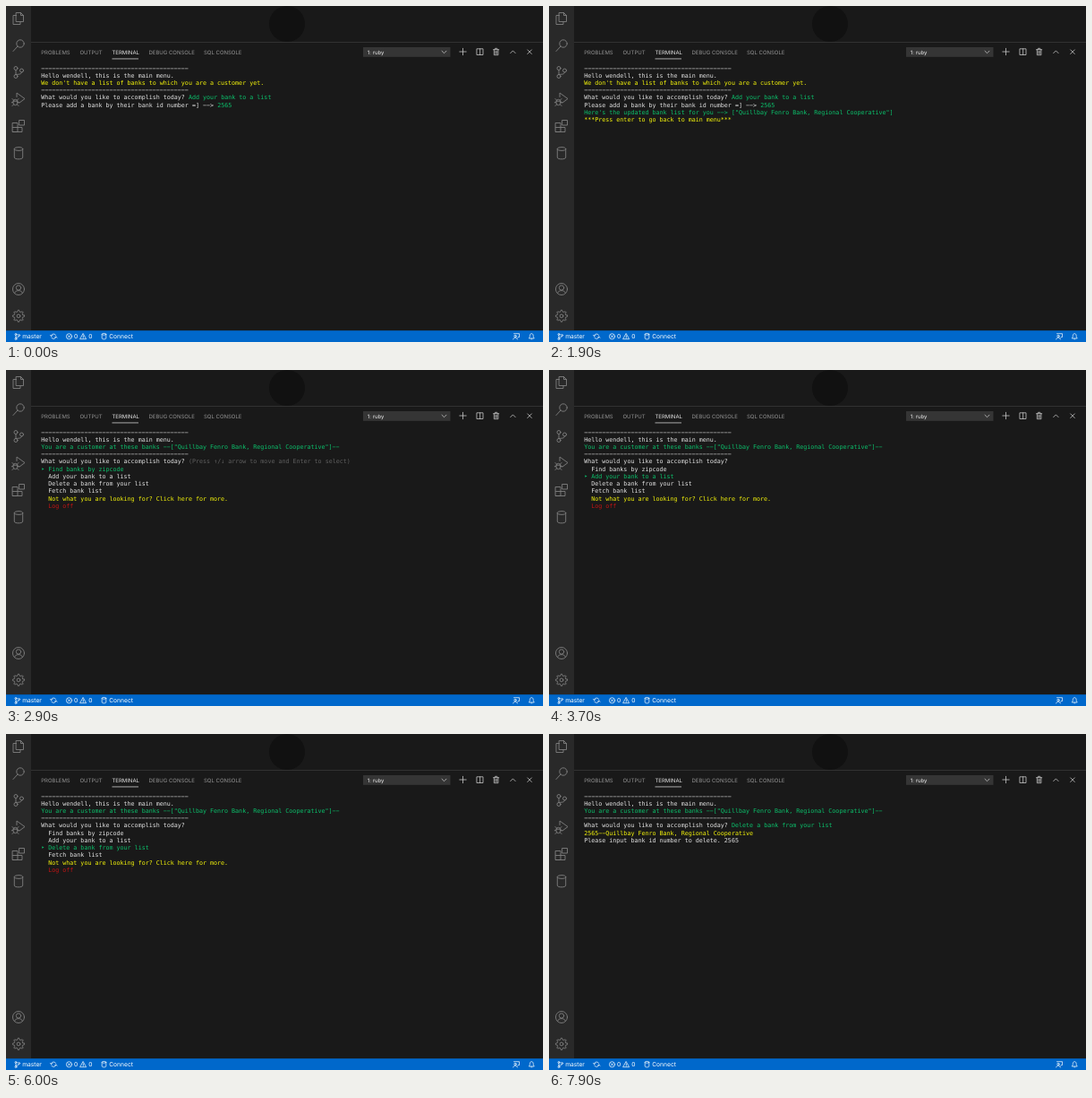
Animation, 600 px wide and 375 px high, one loop 8 s. Source, as an HTML page:

```html
<!DOCTYPE html>
<html lang="en">
<head>
<meta charset="utf-8">
<title>Terminal session</title>
<style>
  html, body { margin: 0; width: 100%; height: 100%; overflow: hidden; background: #191919; }
  svg { display: block; width: 100vw; height: 100vh; }
  text { white-space: pre; text-rendering: geometricPrecision; }
  #term { font: 6.68px "DejaVu Sans Mono", monospace; }
  .tabs { font: 6px Inter, sans-serif; fill: #939393; }
  .status text { font: 6.7px Inter, sans-serif; fill: #fff; }
  .line { fill: none; stroke-linecap: round; stroke-linejoin: round; }
  .side { stroke: #7f7f7f; stroke-width: .9; }
  .tool { stroke: #c5c5c5; stroke-width: .8; }
  .bar { stroke: #fff; stroke-width: .7; }
</style>
</head>
<body>
<svg viewBox="0 0 600 375" preserveAspectRatio="none">
  <rect width="600" height="375" fill="#191919"/>
  <circle cx="314" cy="20" r="20" fill="#111"/>
  <rect x="28" y="40.4" width="572" height=".6" fill="#414141"/>
  <rect width="28" height="362" fill="#292929"/>

  <g class="line side">
    <path d="M11.5 7.5h5l3 3v7h-8zM16.5 7.5v3h3M11.5 10.5h-3.5v10h8v-3"/>
    <g><circle cx="16" cy="42" r="4.2"/><path d="M13 45l-5 5.5"/></g>
    <g><circle cx="11" cy="69.5" r="2"/><circle cx="11" cy="78.5" r="2"/><circle cx="17.5" cy="72" r="2"/><path d="M11 71.5v5M17.5 74c0 2-2 2.2-6.5 2.5"/></g>
    <g><path d="M12 101.500V97l9 6.500-6 4.500"/><ellipse cx="10.500" cy="107.500" rx="2.600" ry="3.200"/><path d="M8 106.200h5M7 103.500l1.500 1.500M14 103.500l-1.500 1.500M6.300 107.700h1.600M13.100 107.700h1.600M7 111.500l1.500-1.500M14 111.500l-1.500-1.500"/></g>
    <path d="M7.500 130.500h5.500v10h-5.500zM7.500 135.500h10.500v5h-10.500M15 127.500h5.500v5.500h-5.500z"/>
    <g><ellipse cx="14" cy="159.500" rx="4.700" ry="1.900"/><path d="M9.300 159.500v9.500c0 2.500 9.400 2.500 9.400 0v-9.500"/></g>
    <g><circle cx="14" cy="316" r="6.500"/><circle cx="14" cy="314.500" r="2.700"/><path d="M9.500 320.500c1-4 8-4 9 0"/></g>
    <g><path id="gear"/><circle cx="14" cy="346" r="1.900"/></g>
  </g>

  <g class="tabs">
    <text x="39.200" y="53.500">PROBLEMS</text>
    <text x="82.500" y="53.500">OUTPUT</text>
    <text x="118.500" y="53.500" fill="#e7e7e7">TERMINAL</text>
    <text x="159.500" y="53.500">DEBUG CONSOLE</text>
    <text x="221" y="53.500">SQL CONSOLE</text>
    <rect x="118.500" y="58.600" width="29.500" height=".7" fill="#e7e7e7"/>
    <rect x="399" y="46" width="97.500" height="10.800" fill="#353535"/>
    <text x="403.800" y="53.500" fill="#f0f0f0">1: ruby</text>
  </g>
  <g class="line tool">
    <path d="M487 50.200l2.500 2.500 2.500-2.500"/>
    <path d="M506.800 51h7.400M510.500 47.300v7.400"/>
    <path d="M526.300 47.800h6.700v6.700h-6.700zM529.650 47.800v6.700"/>
    <path d="M544.500 48.700h6.200M546.500 48.500v-1.200h2.200v1.200M545.300 48.900v5.800h4.600v-5.800M546.900 50.300v3M548.300 50.300v3"/>
    <path d="M563.700 52.600l2.700-2.700 2.700 2.700"/>
    <path d="M582.700 48.900l4.600 4.600M587.300 48.900l-4.600 4.600"/>
  </g>

  <g id="term"></g>

  <g class="status">
    <rect y="362.200" width="600" height="12.800" fill="#0068cb"/>
    <g class="line bar">
      <circle cx="11" cy="366.500" r="1"/><circle cx="11" cy="371.500" r="1"/><circle cx="14.500" cy="367.500" r="1"/>
      <path d="M11 367.500v3M14.500 368.500c0 1.300-1.500 1.300-3.500 1.500"/>
      <path d="M50.500 368.200a2.800 2.800 0 0 1 5.200-.7M55.900 369.200a2.800 2.800 0 0 1-5.200.8M49.500 367.300l1 1.200 1.300-.8M57 370.200l-1.100-1.200-1.300.8"/>
      <circle cx="70.500" cy="368.800" r="3.100"/><path d="M69.300 367.600l2.400 2.400M71.700 367.600l-2.400 2.400"/>
      <path d="M86.300 365.800l3.300 5.900h-6.600zM86.300 367.900v1.800M86.300 370.700v.1"/>
      <ellipse cx="109.500" cy="366.300" rx="2.300" ry=".9"/><path d="M107.200 366.300v4.700c0 1.200 4.600 1.200 4.600 0v-4.700"/>
      <circle cx="569" cy="368.500" r="1.200"/><path d="M566.700 372c.3-2.600 4.300-2.600 4.600 0M567.500 365.700h6v3.800h-1.300l-1 1"/>
      <path d="M584.500 370.700c1-1 .7-2 .8-2.800.2-3 3.700-3 3.900 0 .1.800-.2 1.800.8 2.800zM586.600 371.700c.3.600 1 .6 1.300 0"/>
    </g>
    <text x="18.200" y="371.300">master</text>
    <text x="76" y="371.300">0</text>
    <text x="92.200" y="371.300">0</text>
    <text x="115.200" y="371.300">Connect</text>
  </g>
</svg>

<script>
const LOOP = 8000, LEFT = 39.2, CELL = 4.02, TOP = 71.6, PITCH = 8.22;
const WHITE = '#e5e5e5', GREEN = '#0bc26c', YELLOW = '#f7f70a', RED = '#c31414', GRAY = '#5f5f5f';
const BANK = 'Quillbay Fenro Bank, Regional Cooperative';
const ID = '2565';
const ITEMS = ['Find banks by zipcode', 'Add your bank to a list', 'Delete a bank from your list',
  'Fetch bank list', 'Not what you are looking for? Click here for more.', 'Log off'];
const ITEM_COLORS = [WHITE, WHITE, WHITE, WHITE, YELLOW, RED];

const RULE = [[WHITE, '\u2212'.repeat(41)]];
const HELLO = [[WHITE, 'Hello wendell, this is the main menu.']];
const NO_BANKS = [[YELLOW, "We don't have a list of banks to which you are a customer yet."]];
const MY_BANKS = [[GREEN, `You are a customer at these banks \u2212\u2212["${BANK}"]\u2212\u2212`]];

const head = banks => [RULE, HELLO, banks, RULE];
const ask = (color, answer) => [[WHITE, 'What would you like to accomplish today? '], [color, answer]];

function addScreen(done) {
  const rows = [...head(NO_BANKS), ask(GREEN, ITEMS[1]),
    [[WHITE, 'Please add a bank by their bank id number =] \u2212\u2212> '], [GREEN, ID]]];
  if (done) rows.push(
    [[GREEN, `Here's the updated bank list for you \u2212\u2212> ["${BANK}"]`]],
    [[YELLOW, '***Press enter to go back to main menu***']]);
  return rows;
}

function menuScreen(pick, hint) {
  const rows = ITEMS.map((item, i) => i === pick
    ? [[GREEN, '\u2023 ' + item]] : [[ITEM_COLORS[i], '  ' + item]]);
  return [...head(MY_BANKS), ask(GRAY, hint ? '(Press \u2191/\u2193 arrow to move and Enter to select)' : ''), ...rows];
}

function deleteScreen(typed) {
  return [...head(MY_BANKS), ask(GREEN, ITEMS[2]),
    [[YELLOW, `${ID}\u2212\u2212${BANK}`]],
    [[WHITE, 'Please input bank id number to delete. ' + ID.slice(0, typed)]]];
}

function screenAt(t) {
  if (t < 2000) return addScreen(t >= 100);
  if (t < 3200) return menuScreen(0, true);
  if (t < 6100) return menuScreen(t < 3800 ? 1 : t < 4200 ? 0 : t < 4500 ? 1 : 2, false);
  return deleteScreen(Math.max(0, Math.min(4, Math.floor((t - 7000) / 200))));
}

const escapeText = s => s.replace(/&/g, '&amp;').replace(/</g, '&lt;').replace(/>/g, '&gt;');

function markup(rows) {
  return rows.map((row, r) => {
    let col = 0;
    return row.map(([color, s]) => {
      const x = LEFT + col * CELL;
      col += s.length;
      return `<text x="${x.toFixed(2)}" y="${(TOP + r * PITCH).toFixed(2)}" fill="${color}">${escapeText(s)}</text>`;
    }).join('');
  }).join('');
}

function gearPath(cx, cy) {
  const points = [];
  for (let i = 0; i < 32; i++) {
    const a = (i - 0.5) * Math.PI / 16, r = i % 4 < 2 ? 6.6 : 4.8;
    points.push((cx + r * Math.cos(a)).toFixed(2) + ' ' + (cy + r * Math.sin(a)).toFixed(2));
  }
  return 'M' + points.join('L') + 'Z';
}
document.getElementById('gear').setAttribute('d', gearPath(14, 346));

const term = document.getElementById('term');
let shown = '';
function draw() {
  const next = markup(screenAt(performance.now() % LOOP));
  if (next !== shown) term.innerHTML = shown = next;
  requestAnimationFrame(draw);
}
draw();
</script>
</body>
</html>
```
